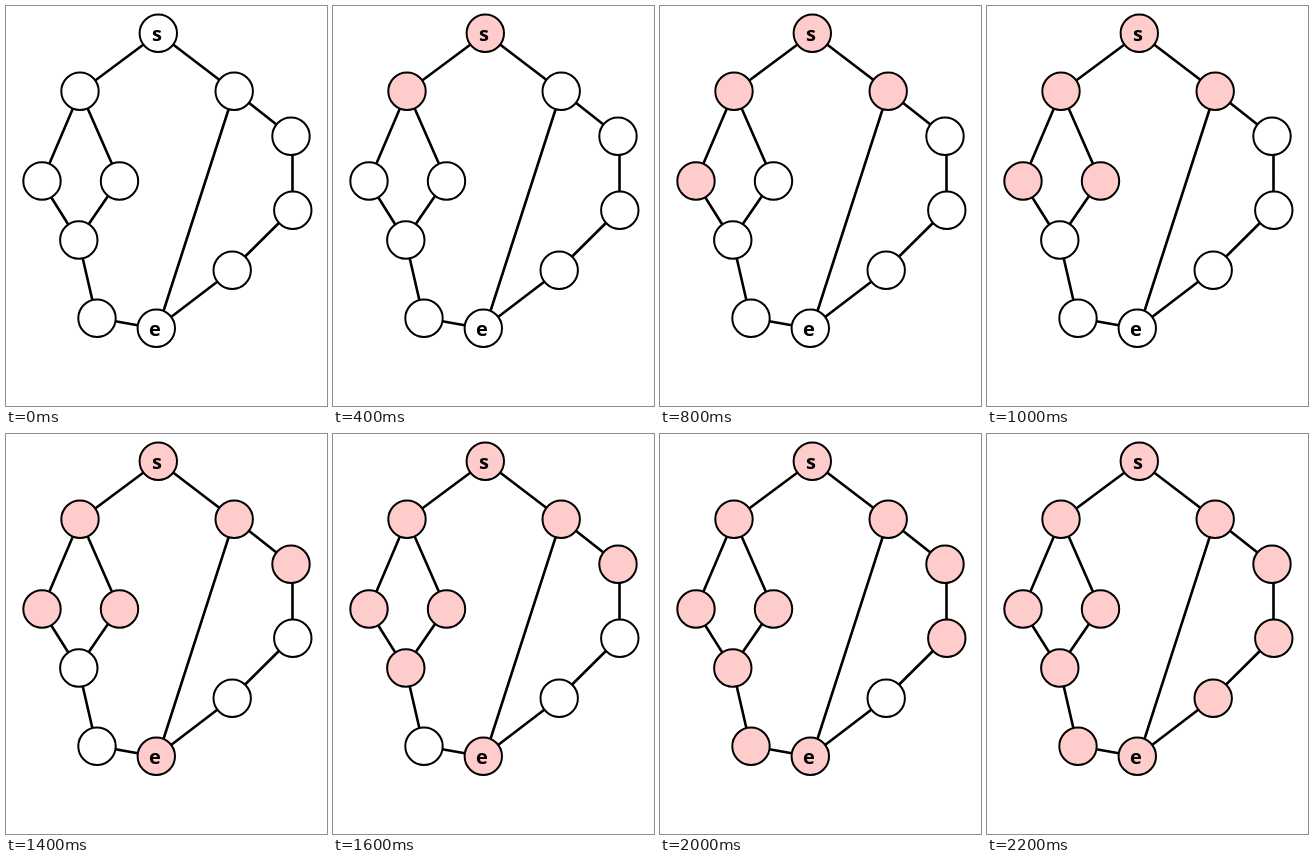
Write an HTML page that moves like this. It is 321 by 400 pixels and loops after 2.4 s.

```html
<!DOCTYPE html>
<html lang="en">
<head>
<meta charset="utf-8">
<title>Breadth-first search</title>
<style>
  @property --step {
    syntax: "<integer>";
    inherits: true;
    initial-value: 0;
  }
  html, body { margin: 0; width: 100%; height: 100%; overflow: hidden; background: #fff; }
  svg { display: block; width: 321px; height: 400px; animation: visit 2400ms steps(12, end) infinite; }
  @keyframes visit {
    from { --step: 0; }
    to { --step: 12; }
  }
  .edges { fill: none; stroke: #000; stroke-width: 2.6; }
  /* A node turns pink once the step reaches its place in the order. */
  circle {
    --on: clamp(0, var(--step) - var(--order) + 1, 1);
    --tint: calc(255 - 51 * var(--on));
    r: 18.7px;
    fill: rgb(255, var(--tint), var(--tint));
    stroke: #000;
    stroke-width: 2;
  }
  text { font: bold 20px "Open Sans", "Noto Sans", sans-serif; text-anchor: middle; }
</style>
</head>
<body>
<svg viewBox="0 0 321 400">
  <path class="edges" d="M36 175L74 85.8L152 27.8M152 27L228 85L285 130M286.5 130V204M286 204L225.5 264
    M226 264.5L150 322.5M152 322L228.5 85M74 85L113.5 175M112.3 175L71.8 234M35 175L72 234
    M72.5 234L90.5 312M91 312L150 322.5"/>
  <circle cx="152.3" cy="27.2" style="--order:1"/>
  <circle cx="74" cy="85.2" style="--order:2"/>
  <circle cx="228.2" cy="85.2" style="--order:3"/>
  <circle cx="36" cy="175" style="--order:4"/>
  <circle cx="113.5" cy="175" style="--order:5"/>
  <circle cx="150.3" cy="322.2" style="--order:6"/>
  <circle cx="285" cy="130.2" style="--order:7"/>
  <circle cx="72.8" cy="234" style="--order:8"/>
  <circle cx="286.8" cy="204.2" style="--order:9"/>
  <circle cx="91" cy="312.2" style="--order:10"/>
  <circle cx="226.2" cy="264.3" style="--order:11"/>
  <text x="151" y="35">s</text>
  <text x="149" y="330">e</text>
</svg>
</body>
</html>
```
